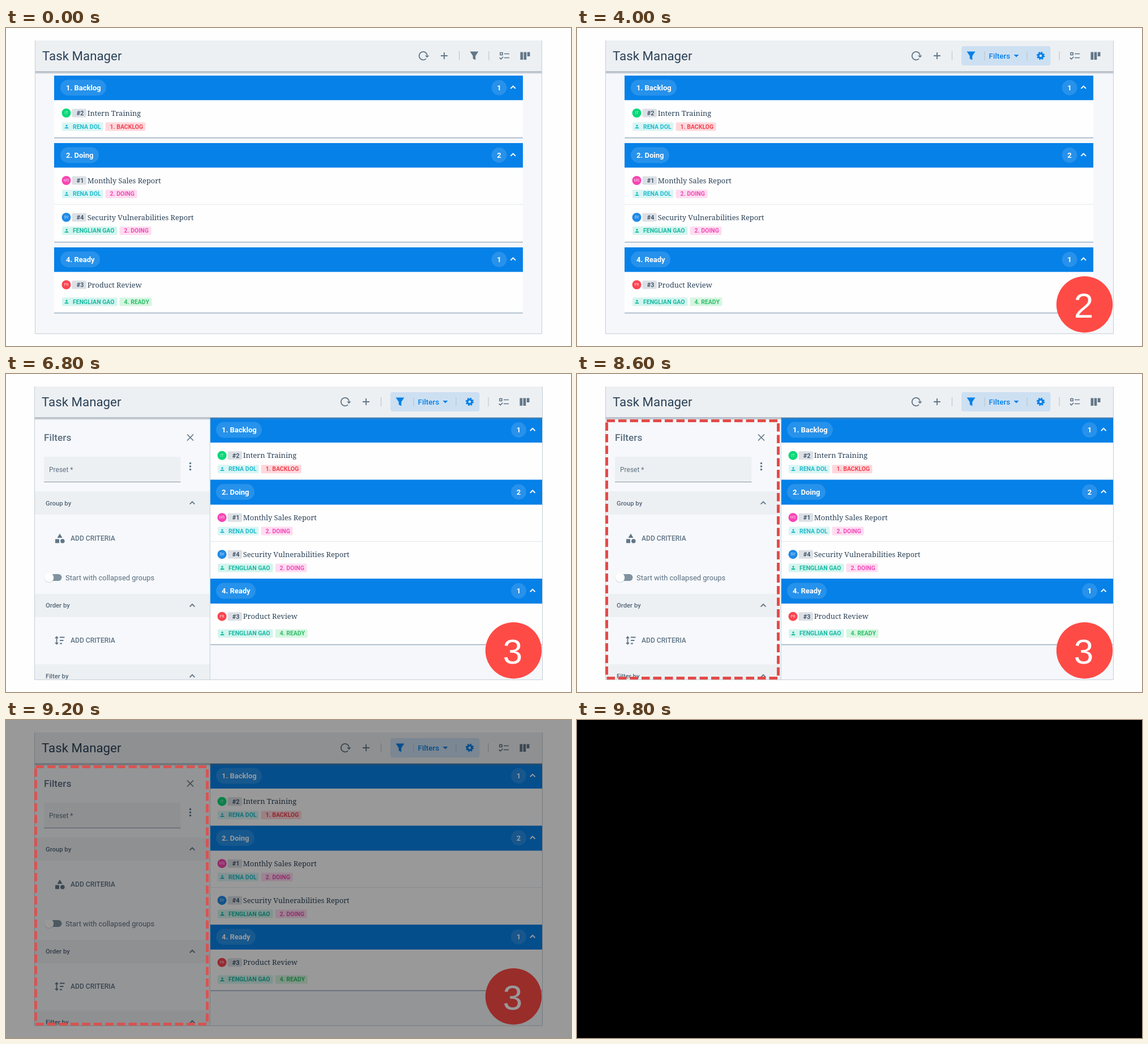
An HTML page for the animation above (10 s loop, 998 px wide and 561 px high).

```html
<!DOCTYPE html>
<html lang="en">
<head>
<meta charset="utf-8">
<title>Task Manager filters</title>
<style>
html, body { margin: 0; width: 100%; height: 100%; overflow: hidden; background: #fefefe; }
svg { display: block; width: 998px; height: 561px; font-family: Roboto, sans-serif; }
.slab { font-family: "Noto Serif", serif; }
.digit { font-family: "Liberation Sans", Arial, sans-serif; }
</style>
</head>
<body>
<svg id="stage" viewBox="0 0 998 561" xmlns="http://www.w3.org/2000/svg"></svg>
<script>
const LOOP = 10000, STEP = 200;
const BLUE = '#0681e8', RED = '#ff4b46', INK = '#2c4258', GREY = '#627788';

// y is the middle of the capitals
const text = (x, y, s, size, fill, more = '') =>
  `<text x="${x}" y="${y + size * .356}" font-size="${size}" fill="${fill}" ${more}>${s}</text>`;
const rect = (x, y, w, h, fill, more = '') =>
  `<rect x="${x}" y="${y}" width="${w}" height="${h}" fill="${fill}" ${more}/>`;
const disc = (x, y, r, fill, more = '') =>
  `<circle cx="${x}" cy="${y}" r="${r}" fill="${fill}" ${more}/>`;
const line = (d, color, w, more = '') =>
  `<path d="${d}" fill="none" stroke="${color}" stroke-width="${w}" ${more}/>`;
const shape = (d, fill) => `<path d="${d}" fill="${fill}"/>`;
const at = (x, y, body) => `<g transform="translate(${x} ${y})">${body}</g>`;
const MEDIUM = 'font-weight="500"', BOLD = 'font-weight="600"', MID = 'text-anchor="middle"';

const icons = {
  refresh: line('M5 5.2A7.2 7.2 0 1 1 7 -1', GREY, 1.9) + shape('M3 -.5H10.6L6.8 3.6Z', GREY),
  plus: line('M-6 0H6M0 -6V6', GREY, 1.9),
  sep: line('M0 -8V8', '#bcc5cc', 1.2),
  checks: line('M-7 -5.5h4v4h-4zM-8.2 3.4l2.4 2.4 4 -4M0 -3.5H9M0 3.5H9', GREY, 1.7),
  columns: shape('M-8.5 -6.5h4.7v13.5h-4.7zM-2.4 -6.5h4.7v13.5h-4.7zM3.8 -6.5h4.7v7.5h-4.7z', GREY),
  gear: `<circle r="4" fill="none" stroke="${BLUE}" stroke-width="3.4"/>` +
    `<circle r="6" fill="none" stroke="${BLUE}" stroke-width="2.4" stroke-dasharray="2.4 2.312"/>`,
  user: c => disc(0, -1.8, 1.7, c) + shape('M-3.6 3.3Q-3.6 .7 0 .7T3.6 3.3Z', c),
  funnel: c => shape('M-7.5 -7.5H7.5L2.3 .2V7.5L-2.3 5V.2Z', c),
  chevron: c => line('M-4.3 2.2L0 -2.2L4.3 2.2', c, 1.9),
  shapes: shape('M0 -8.5L4.5 -1H-4.5ZM-8 1.2h7v7h-7z', GREY) + disc(4.8, 4.8, 3.8, GREY),
  sort: line('M-5.5 -6V6M-8 -3.8L-5.5 -6.5L-3 -3.8M-8 3.8L-5.5 6.5L-3 3.8M0 -5.5H8.5M0 0H6.5M0 5.5H4', GREY, 1.8)
};

const people = {
  rena: ['RENA DOL', 72.5, '#d9f5f4', '#20bccd'],
  feng: ['FENGLIAN GAO', 97.5, '#d3f5ee', '#18b9a3']
};
const states = {
  backlog: ['1. BACKLOG', 71, '#ffd7dc', '#f0434f'],
  doing: ['2. DOING', 56, '#ffdcf0', '#f04cba'],
  ready: ['4. READY', 57, '#d6f6e1', '#2fbf69']
};
// group: title, pill width, body bottom, gap to tags, tasks
const groups = [
  ['1. Backlog', 81, 109, 24, [['IT', '#0bd879', '#2', 'Intern Training', 'rena', 'backlog']]],
  ['2. Doing', 68, 174, 23.7, [
    ['MS', '#f745b4', '#1', 'Monthly Sales Report', 'rena', 'doing'],
    ['SV', '#1f8ae6', '#4', 'Security Vulnerabilities Report', 'feng', 'doing']]],
  ['4. Ready', 70, 115, 30, [['PR', '#fb4450', '#3', 'Product Review', 'feng', 'ready']]]
];

function task([initials, color, id, name, who, state], x, y, gap) {
  const [person, pw, pbg, pfg] = people[who], [label, sw, sbg, sfg] = states[state];
  const ty = y + gap, sx = x + pw + 7;
  return disc(x + 10.5, y, 8, color) +
    text(x + 10.5, y, initials, 6.4, '#ffffffcc', MID) +
    rect(x + 20.5, y - 7.5, 25.5, 15, '#dce0e5', 'rx="2"') +
    text(x + 28.6, y, id, 10.8, INK, MEDIUM) +
    text(x + 47.8, y, name, 12.8, INK, 'class="slab"') +
    rect(x + 3, ty - 7.5, pw, 15, pbg, 'rx="2"') +
    at(x + 11, ty, icons.user(pfg)) +
    text(x + 22, ty, person, 10.5, pfg, BOLD) +
    rect(sx, ty - 7.5, sw, 15, sbg, 'rx="2"') +
    text(sx + 8, ty, label, 10.5, sfg, BOLD);
}

function list(x, left, right, tops, d) {
  return groups.map(([title, pill, bottom, gap, tasks], i) => {
    const y = tops[i], cy = y + 21.2 + d / 2, head = 43.3 + d, n = right - 42;
    const rows = tasks.map((t, k) =>
      (k ? line(`M${left} ${y + 108.2 + d}H${right}`, '#e2e6ea', 1) : '') +
      task(t, x, y + 66 + d + 65 * k, gap)).join('');
    return rect(left, y + 1, right - left, bottom + d + .5, '#9fb0c0', 'rx="1"') +
      rect(left, y, right - left, bottom + d, '#fefefe') +
      rect(left, y, right - left, head, BLUE) +
      rect(x, cy - 14, pill, 28, '#ffffff22', 'rx="14"') +
      text(x + 10, cy, title, 13, '#fff', BOLD) +
      disc(n, cy, 13.5, '#ffffff22') +
      text(n, cy, tasks.length, 13, '#fff', BOLD + ' ' + MID) +
      at(right - 17.3, cy - .5, icons.chevron('#fff')) + rows;
  }).join('');
}

function bar(left, right, open) {
  const s = open ? -1 : 0, m = open ? -138 : 0;
  const put = (x, body) => at(x, 49, body);
  const middle = open
    ? rect(679, 32, 157.5, 34, '#cde0f2', 'rx="4"') + put(696, icons.funnel(BLUE)) +
      put(720, icons.sep) + text(727.5, 49, 'Filters', 13.5, BLUE, MEDIUM) +
      put(776, shape('M-4.5 -2H4.5L0 2.5Z', BLUE)) + put(795, icons.sep) + put(819, icons.gear)
    : put(827, icons.funnel(GREY));
  return rect(left, 22, right - left, 55, '#edf0f3') +
    rect(left, 76.5, right - left, 5, 'url(#shade)') +
    text(64 + s, 49, 'Task Manager', 22.3, INK) +
    put(737 + m, icons.refresh) + put(774 + m, icons.plus) + put(800.5 + m, icons.sep) + middle +
    put(853 + s, icons.sep) + put(880 + s, icons.checks) + put(917 + s, icons.columns);
}

function panel() {
  const section = (y, name) => rect(50, y - 20.5, 310, 41, '#edf0f2') +
    text(70, y, name, 11.3, '#53677a', MEDIUM) + at(329, y, icons.chevron(GREY));
  const add = (y, icon) => at(95, y, icon) + text(114, y, 'ADD CRITERIA', 12.1, '#5f7385', MEDIUM);
  return rect(50, 77, 310, 462, '#f6f8fb') +
    text(67, 112, 'Filters', 17.3, '#5a6e80', MEDIUM) +
    line('M320 106.5l11 11M331 106.5l-11 11', GREY, 1.7) +
    rect(67, 146, 241.5, 44, '#edf0f3', 'rx="3"') + line('M67 190.5H308.5', '#8797a4', 1) +
    text(76, 168.5, 'Preset *', 12, '#5f7283') +
    [157.5, 163, 168.5].map(y => disc(325.5, y, 1.8, GREY)).join('') +
    section(227.5, 'Group by') + add(290, icons.shapes) +
    rect(74, 353, 24.5, 12, '#8092a0', 'rx="6"') +
    disc(76, 359.8, 8.3, '#ccd3d9') + disc(76, 359, 8, '#fefefe') +
    text(105, 359, 'Start with collapsed groups', 12.95, '#5a6e80') +
    section(408.3, 'Order by') + add(470, icons.sort) + section(532.8, 'Filter by') +
    line('M360.3 77V539', '#c9d1d8', 1);
}

const scene = (id, left, right, body, open) => `<g id="${id}">` +
  rect(left, 22, right - left, 517, '#f5f7fb') + `<g clip-path="url(#view)">${body}</g>` +
  bar(left, right, open) +
  line(`M${left + .5} 22V539.3H${right - .5}V22`, '#c4cdd5', 1) + '</g>';

const hand = `<path d="M832.5 60Q831.5 55 836 55.500Q838 56 839.500 60L842 66
  Q845 63 848 65.500Q851 63.500 854 66.500Q859 65.500 860.500 70Q862.500 77 858 83L857 89.500H841L839.500 84.500
  Q834 79 831 74Q830 70 834 70.500L838 73.500Z" fill="#fff" stroke="#111" stroke-width="1.8" stroke-linejoin="round"/>` +
  line('M839 82.5H858M845 72.500V80M849.500 72.500V80M854 72.500V80M842 66L843.500 71', '#111', 1.5);

const $ = id => document.getElementById(id);
$('stage').innerHTML = `<defs>
  <linearGradient id="shade" x2="0" y2="1"><stop stop-color="#6b7d8c" stop-opacity=".65"/>
  <stop offset="1" stop-color="#6b7d8c" stop-opacity="0"/></linearGradient>
  <clipPath id="view"><rect x="49" y="22" width="900" height="517"/></clipPath></defs>` +
  rect(0, 0, 998, 561, '#fefefe') +
  scene('plain', 51, 947, list(96, 85, 913, [84, 203, 387], 0), false) +
  scene('toolbar', 50, 948, list(95, 84, 912, [84, 203, 387], 0), true) +
  scene('side', 50, 948, list(371, 361, 947.5, [77, 186.5, 361], .7) + panel(), true) +
  '<g id="ring"><circle cx="827.5" cy="48.3" r="21.5" fill="none" stroke="#e5403e" stroke-width="1.6"/></g>' +
  `<g id="hand">${hand}</g>` +
  `<g id="badge">${disc(0, 0, 49.7, RED)}<text id="num" y="23.300" font-size="62" fill="#fff" ${MID}></text></g>` +
  rect(0, 0, 998, 561, '#000', 'id="night"') +
  `<rect id="dash" x="52.5" y="82.500" width="303" height="454" fill="none" stroke="#e34a48"
    stroke-width="5" stroke-dasharray="14.500 6"/>`;

// Linear track over [time, value] pairs
function track(t, keys) {
  if (t <= keys[0][0]) return keys[0][1];
  for (let i = 1; i < keys.length; i++) {
    const [a, u] = keys[i - 1], [b, v] = keys[i];
    if (t < b) return u + (v - u) * (t - a) / (b - a);
  }
  return keys[keys.length - 1][1];
}
const ease = p => 1 - (1 - p) ** 3;
const show = (id, alpha) => $(id).setAttribute('opacity', alpha);
const move = (id, x, y, k = 1) => $(id).setAttribute('transform', `translate(${x} ${y}) scale(${k})`);

function draw(t) {
  const step = t < 3400 ? 1 : t < 6800 ? 2 : 3;
  ['plain', 'toolbar', 'side'].forEach((id, i) => { $(id).style.display = step === i + 1 ? '' : 'none'; });

  const shift = step === 2 ? -8.5 : 0;
  const [from, to] = step === 1 ? [1000, 1800] : [4000, 4800];
  const away = 1 - ease(track(t, [[from, 0], [to, 1]]));
  const press = step === 1 ? track(t, [[2200, 1], [2600, .92], [3000, 1]]) : 1;
  const tx = 834 * (1 - press), ty = 56 * (1 - press);
  move('hand', shift - 90 * away + tx, 130 * away + ty, press);
  show('hand', step < 3 ? track(t, [[from, 0], [from + 200, 1]]) : 0);
  move('ring', shift, 0);
  show('ring', step < 3 ? track(t, [[to - 400, 0], [to, 1]]) : 0);

  move('badge', step === 1 ? 894.7 : 896.5, 487.7);
  show('badge', track(t, [[800, 0], [1200, 1]]));
  const num = $('num');
  num.textContent = step;
  num.setAttribute('class', step === 1 ? '' : 'digit');
  num.setAttribute('x', step === 1 ? 2 : -1.5);

  show('night', track(t, [[8800, 0], [9800, 1]]));
  show('dash', track(t, [[7800, 0], [8200, 1], [8800, 1], [9400, .8], [9800, 0]]));
}

const start = performance.now();
function tick() {
  const t = (performance.now() - start) % LOOP;
  draw(Math.floor(t / STEP) * STEP);
  requestAnimationFrame(tick);
}
tick();
</script>
</body>
</html>
```
